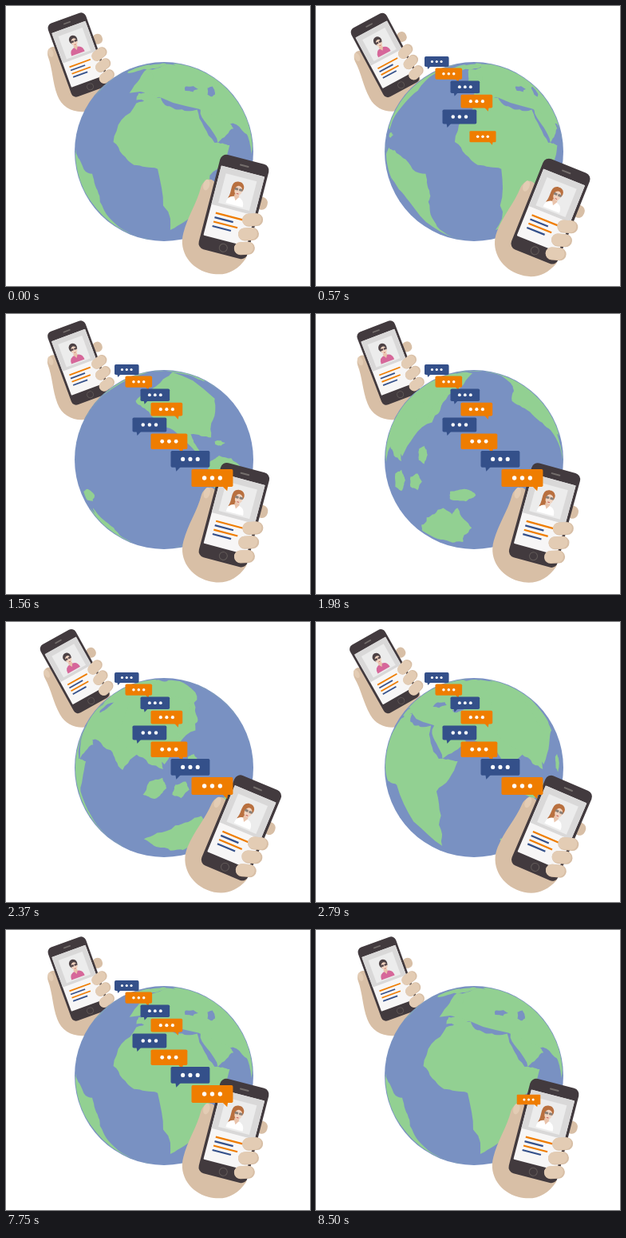
An HTML page with a canvas for the animation above (8530 ms loop, 381x350 px).

```html
<!DOCTYPE html>
<html lang="en">
<head>
<meta charset="utf-8">
<title>Messages around the world</title>
<style>
html, body { margin: 0; width: 100%; height: 100%; overflow: hidden; background: #fff; }
canvas { display: block; }
</style>
</head>
<body>
<canvas id="stage" width="381" height="350"></canvas>
<script>
const ctx = document.getElementById('stage').getContext('2d');
const LOOP = 8530, SPIN = 3750, SWAY = 1740;
const SEA = '#7991c2', LAND = '#92d092', PALM = '#d8bfa6', FINGER = '#e3ccb4', DARK = '#423a3e';
const BLUE = '#34508a', ORANGE = '#ef7d00';
const globe = { x: 198, y: 182, r: 112 };
const rad = d => d * Math.PI / 180;
const clamp = (v, lo = 0, hi = 1) => Math.min(hi, Math.max(lo, v));
const smooth = p => p * p * (3 - 2 * p);
const turnAt = t => 2 * Math.PI * smooth(clamp(t / SPIN));

let seed = 7;
const random = () => (seed = seed * 16807 % 2147483647) / 2147483647;

// Splits an edge again and again, pushing each midpoint sideways.
function coast(a, b, depth = 3) {
  if (!depth) return [a];
  const push = (random() - .5) * .22;
  const mid = [(a[0] + b[0]) / 2 + (a[1] - b[1]) * push, (a[1] + b[1]) / 2 + (b[0] - a[0]) * push];
  return [...coast(a, mid, depth - 1), ...coast(mid, b, depth - 1)];
}

// Key points lie on the visible disc as it is turned at time t; they become longitude and latitude.
function land(t, outline, color = LAND) {
  const corners = outline.split(' ').map(pair => {
    const [x, y] = pair.split(',').map(Number);
    const lat = Math.asin(clamp((y - globe.y) / globe.r, -1, 1));
    const lon = Math.asin(clamp((x - globe.x) / (globe.r * Math.cos(lat) || 1), -1, 1));
    return [lon - turnAt(t), lat];
  });
  return { ring: corners.flatMap((p, i) => coast(p, corners[(i + 1) % corners.length])), color };
}

function island(t, x, y, rx, ry, color) {
  const corners = Array.from({ length: 5 }, (_, i) =>
    `${x + rx * Math.cos(i * 1.26)},${y + ry * Math.sin(i * 1.26)}`);
  return land(t, corners.join(' '), color);
}

const africa = land(0, '163,121 194,114 199,123 214,129 240,129 262,171 281,174 256,212 230,266 206,281 190,204 160,199 134,170');
const europe = land(0, '163,117 166,108 180,106 186,97 199,91 204,77 250,85 272,100 303,145 292,149 273,137 286,153 266,171 244,134 243,119 214,110 214,118 199,106 176,118');
const southAsia = land(2790, '112,108 150,78 198,71 240,79 270,97 296,135 286,178 270,158 243,185 224,160 172,142');
const eastAsia = land(1980, '92,165 88,140 120,100 145,82 196,73 160,104 148,92 125,122 127,143 108,162 106,184');
const japan = land(1980, '139,130 157,104 154,122');
const australia = land(1980, '133,272 138,255 159,243 170,251 177,243 195,268 184,286 152,282');
const northAmerica = land(1140, '190,72 140,90 115,108 110,125 118,145 151,187 134,160 133,150 157,154 160,142 193,105');
const southAmerica = land(1140, '150,185 165,177 205,190 240,210 235,238 212,268 197,293 190,245 160,215');
const lands = [
  africa, europe, southAsia, eastAsia, japan, australia, northAmerica, southAmerica,
  island(1140, 217, 77, 14, 6),
  island(1140, 168, 161, 9, 3),
  island(1980, 133, 176, 6, 12),
  island(1980, 104, 208, 7, 14),
  island(1980, 124, 210, 8, 11),
  island(1980, 182, 227, 18, 8),
  island(0, 181, 87, 4, 5),
  island(0, 232, 103, 9, 4, SEA),
  island(0, 257, 106, 5, 7, SEA),
];

// Points on the far side slide to the rim.
function project([lon, lat], turn) {
  let x = Math.cos(lat) * Math.sin(lon + turn), y = Math.sin(lat);
  const front = Math.cos(lon + turn) > 0;
  const scale = (globe.r - 1) / (front ? 1 : Math.hypot(x, y) || 1);
  return { x: globe.x + scale * x, y: globe.y + scale * y, front };
}

function disc(x, y, r, color, ry = r) {
  ctx.fillStyle = color;
  ctx.beginPath();
  ctx.ellipse(x, y, r, ry, 0, 0, 7);
  ctx.fill();
}

function box(x, y, w, h, r, color) {
  ctx.fillStyle = color;
  ctx.beginPath();
  ctx.roundRect(x, y, w, h, r);
  ctx.fill();
}

function shape(path, color) {
  ctx.fillStyle = color;
  ctx.fill(new Path2D(path));
}

function drawGlobe(turn) {
  disc(globe.x, globe.y, globe.r, SEA);
  for (const { ring, color } of lands) {
    const points = ring.map(p => project(p, turn));
    if (!points.some(p => p.front)) continue;
    ctx.beginPath();
    points.forEach(p => ctx.lineTo(p.x, p.y));
    ctx.fillStyle = color;
    ctx.fill();
  }
}

function drawPortrait({ hair, top, lens, long }) {
  if (long) shape('M-2-32C-13-30-6-18-10-9L0-12Z', hair);
  shape('M-11-2Q-11-13 0-13Q11-13 11-2Z', top);
  shape('M-3-16L3-16L3-13L0-8L-3-13Z', '#e9c3ab');
  disc(0, -25, 6.5, hair, 7);
  disc(.5, -21, 4.8, '#f0d3c0', 6);
  box(-4.5, -24, 4.5, 3, 1, lens);
  box(1, -24, 4.5, 3, 1, lens);
  box(-1, -17.5, 3, 1, .5, '#c35a56');
}

function drawPhone(phone, sway) {
  const [px, py] = phone.pivot;
  ctx.save();
  ctx.translate(px, py);
  ctx.rotate(rad(phone.swing * sway));
  ctx.translate(phone.x - px, phone.y - py);
  ctx.rotate(rad(phone.angle));
  ctx.scale(phone.scale, phone.scale);

  shape('M-29-22C-35-30-45-25-46-14C-46 8-53 25-53 48C-53 72-33 88-10 88C10 88 24 78 31 58L31 0Z', PALM);
  disc(-40, -18, 4, FINGER, 7);
  box(25 + phone.reach, -21, 15, 16, 7, PALM);
  box(-31.5, -61, 63, 122, 8, DARK);
  box(-28, -46, 56, 90, 1, '#f7f6f6');
  box(-28, -46, 56, 50, 0, '#d9d8d8');
  box(-20, -38, 40, 38, 0, '#ececec');
  drawPortrait(phone.person);
  for (let i = 0; i < 4; i++) {
    box(-20, 12 + i * 5.6, i % 2 ? 24 : 35 - 2 * i, 2.2, 0, i % 2 ? BLUE : ORANGE);
  }
  box(-6, -54, 12, 2, 1, '#746e6c');
  disc(0, 53, 5.5, '#625b59');
  disc(0, 53, 4.5, DARK);
  for (let i = 0; i < 3; i++) {
    ctx.save();
    ctx.translate(27 - i / 2 + phone.reach, 10 + 18.5 * i);
    ctx.rotate(rad(-18));
    box(-13, -8, 26, 16, 8, PALM);
    box(-13, -8, 24, 15, 7.5, FINGER);
    ctx.restore();
  }
  ctx.restore();
}

const sender = {
  x: 91, y: 61, angle: -20, scale: .8, reach: 4, pivot: [92, 92], swing: -10,
  person: { hair: '#4d4245', top: '#d6679a', lens: '#57484c', long: false },
};
const receiver = {
  x: 285.5, y: 251, angle: 14.5, scale: 1, reach: 0, pivot: [246, 320], swing: 9,
  person: { hair: '#b9703f', top: '#ffffff', lens: '#8b8078', long: true },
};

// Bubbles grow evenly on their way down; blue and orange alternate.
const bubbles = [136, 149.5, 168.5, 181.5, 158.5, 181.5, 206.5, 232.5].map((x, i) => {
  const h = 13 + 1.3 * i;
  return { x, y: 63 + 13.8 * i + .7 * i * i, w: 2.35 * h, h };
});

function bubbleScale(i, t) {
  const shown = clamp((t - 100 * i) / 150);
  const gone = clamp((t - 7745 - 96 * i) / 128);
  return (1 - (1 - shown) ** 2) * (1 - gone * gone);
}

function drawBubble({ x, y, w, h }, i, t) {
  const scale = bubbleScale(i, t);
  if (scale <= 0) return;
  const isReply = i % 2, side = isReply ? -1 : 1;
  const tipX = x + w * (isReply ? .86 : .14), tipY = y + h * 1.24;
  ctx.save();
  ctx.translate(tipX, tipY);
  ctx.scale(scale, scale);
  ctx.translate(-tipX, -tipY);
  box(x, y, w, h, 1.8, isReply ? ORANGE : BLUE);
  ctx.beginPath();
  ctx.moveTo(tipX, tipY);
  ctx.lineTo(tipX - side, y + h - 1);
  ctx.lineTo(tipX + side * w * .12, y + h - 1);
  ctx.fill();
  for (const k of [-1, 0, 1]) disc(x + w / 2 + k * w * .19, y + h / 2, w * .052, '#fff');
  ctx.restore();
}

function draw(now) {
  const t = now % LOOP;
  const cycle = t < 2 * SWAY ? t % SWAY / SWAY : 0;
  const sway = smooth(smooth(1 - Math.abs(1 - 2 * cycle)));
  ctx.fillStyle = '#fff';
  ctx.fillRect(0, 0, 381, 350);
  drawPhone(sender, sway);
  drawGlobe(turnAt(t));
  drawPhone(receiver, sway);
  bubbles.forEach((bubble, i) => drawBubble(bubble, i, t));
}

const start = performance.now();
function tick() {
  draw(performance.now() - start);
  requestAnimationFrame(tick);
}
tick();
</script>
</body>
</html>
```
